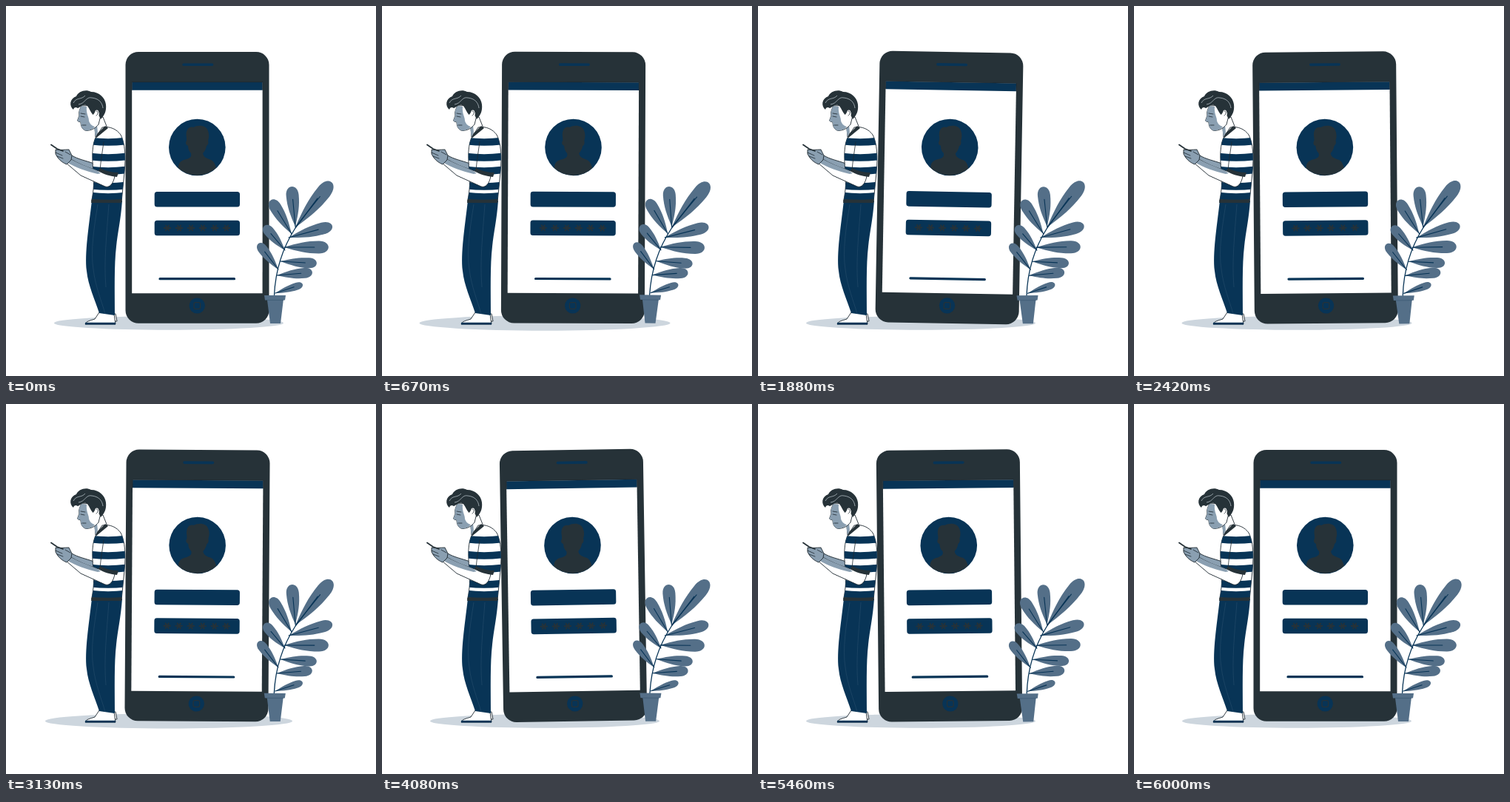
An HTML page for the animation above (6.04 s loop, 500x500 px).

```html
<!DOCTYPE html>
<html lang="en">
<head>
<meta charset="utf-8">
<title>Sign in</title>
<style>
html, body { margin: 0; width: 100%; height: 100%; overflow: hidden; background: #fff; }
svg { display: block; width: 100vw; height: 100vh; }
.navy { fill: #083456; }
.dark { fill: #263238; }
.slate { fill: #546f88; }
.skin { fill: #8a9fb1; }
.white { fill: #fff; }
.ink { stroke: #1d2930; stroke-width: .9; stroke-linejoin: round; }
.line { fill: none; stroke: #083456; stroke-linecap: round; }
.fine { fill: none; stroke: #1d2930; stroke-width: .8; stroke-linecap: round; }
</style>
</head>
<body>
<svg viewBox="0 0 500 500">
  <defs>
    <clipPath id="disc"><circle cx="258.3" cy="191" r="38"/></clipPath>
    <clipPath id="shirt"><path id="torso" d="M130 164C141 162 150 167 155 174C161 185 162 205 160 225L156 265L115.500 264C119 248 119 236 118 222C116 205 116 186 122 176Z"/></clipPath>
  </defs>

  <ellipse id="shadow" cx="220" cy="428.4" rx="155" ry="9.4" fill="#cdd6de"/>

  <g id="phone">
    <rect class="dark" x="161.5" y="62" width="194" height="366.8" rx="17.500"/>
    <path class="white" d="M170.200 103H346.600V388.200H170.200Z"/>
    <path class="navy" d="M170.200 103H346.600V113.800H170.200Z"/>
    <path class="fine" d="M170.200 113V102.700H346.800V113"/>
    <path class="line" d="M240 79.2h38.500" stroke-width="3.600"/>
    <circle class="navy" cx="258.3" cy="405" r="10.600"/>
    <rect x="254" y="400.7" width="8.600" height="8.600" rx="2" fill="none" stroke="#263238" stroke-width="1.300"/>
    <circle class="navy" cx="258.3" cy="191" r="38.300"/>
    <path class="dark" clip-path="url(#disc)" d="M244 178C242 168 247 162 253 164C260 160 271 161 273 169C275 174 274 179 273 182C274 185 273 188 271 189C270 194 268 197 266 199C267 205 272 206 277 208C282 210 283 216 285 222L285 232H231L233 216C234 210 239 208 244 207C249 205 251 204 250 199C247 196 246 193 246 189C243 188 242 185 244 182Z"/>
    <rect class="navy" x="200.7" y="251" width="115.300" height="20.600" rx="3.500"/>
    <rect class="navy" x="200.7" y="289.7" width="115.300" height="20.600" rx="3.500"/>
    <g id="stars" fill="none" stroke="#263238" stroke-width="1.900"/>
    <path class="line" d="M208 368.7h100.500" stroke-width="3.200"/>
  </g>

  <g id="man">
    <!-- legs and shoes -->
    <path class="white ink" d="M136 415L148 416L150 426H136Z"/>
    <path class="white ink" d="M126 414L146 416L148 430H107C108 426 114 425 120 423Z"/>
    <path class="navy" d="M107 427.800H148V430.600H107Z"/>
    <path class="navy" d="M116 263H157C155 290 151 305 149 325C146 350 147 385 147 418L126 415C120 396 111 378 109 358C106 335 112 298 116 263Z"/>
    <path d="M124 268C119 300 114 330 118 356C121 380 129 398 134 416M139 268C136 310 132 345 135 380" fill="none" stroke="#2c5370" stroke-width=".5"/>

    <!-- far arm -->
    <path class="skin ink" d="M81 204L89 202C97 207 108 209 119 213L118 223L92 213Z"/>

    <!-- shirt -->
    <path class="white ink" d="M120 162L121 177L128 177L137 165L131 150H124Z"/>
    <path class="skin" d="M119 165L121 177L124 171L123 161Z"/>
    <use href="#torso" class="white ink"/>
    <g id="stripes" clip-path="url(#shirt)" fill="none" stroke="#083456" stroke-width="9.600"/>
    <path class="dark" d="M121 179L123 173L134 162L138 165Z"/>
    <path class="dark" d="M116 261C130 262 145 262 156.500 261L156 266H115Z"/>
    <path class="fine" d="M132 184C130 198 128 210 127 222"/>

    <!-- near arm -->
    <path class="white ink" d="M86 206C97 213 110 218 122 222L132 225L147 230C145 240 140 246 134 244L101 229L81 212Z"/>
    <path class="skin" d="M86 206C97 213 110 217 122 222L128 226L124 227C108 223 95 219 82 211Z"/>
    <path class="dark" d="M125 223L127 219C135 223 143 225 152 225L150 231C141 230 133 228 125 223Z"/>

    <!-- hand and handset -->
    <path class="skin ink" d="M67 194C73 195 79 194 85 194L89 202L88 208L82 214C77 212 73 209 70 205L67 200Z"/>
    <path class="fine" d="M67 198L76 202M69 203L77 206M80 197L87 201"/>
    <path d="M61 187.500L69 193L77 196" fill="none" stroke="#263238" stroke-width="1.800" stroke-linecap="round"/>

    <!-- head -->
    <path class="white ink" d="M102 135C99 140 98 145 99 148L96.500 155C98 157 100 156 101 157C101 162 103 168 109 168.500C116 168 121 165 125 160L128 148L122 134Z"/>
    <path class="skin" d="M102 135C99 140 98 145 99 148L96.500 155C98 157 100 156 101 157C101 162 103 168 109 168.500C114 168 118 166 120 163C116 162 113 159 112 155C112 149 108 146 109 136Z"/>
    <path class="fine" d="M101 149L106 150M101 145L107 146M103 161L108 161M122 142C125 141 125 147 122 148"/>
    <path class="dark" d="M91 140C85 135 86 125 95 122C98 115 108 112 115 116C126 116 134 124 135 133C136 142 133 148 128 153L125.500 148C127 142 124 139 121 141C120 144 119 146 117.500 147C114 143 113 139 110 135C105 131 100 137 97 138C94 136 92 137 91 140Z"/>
    <path d="M91 131C95 123 102 127 107 121M98 133C107 132 108 122 116 124C125 125 130 130 131 138" fill="none" stroke="#c3cdd5" stroke-width=".7"/>
  </g>

  <g id="plant">
    <g id="leaves"/>
    <path class="line" d="M362.500 391C364 358 373 328 391 300L421 260" stroke-width="1.300"/>
    <path class="slate" d="M349 391H378L377 397.500H374.800L371 429H357L353 397.500H350Z"/>
    <path d="M353 397.500H375" fill="none" stroke="#3e5b75" stroke-width=".8"/>
  </g>
</svg>
<script>
const LOOP = 6040;
const el = id => document.getElementById(id);

el('stars').innerHTML = Array.from({ length: 6 }, (_, i) =>
  `<path transform="translate(${218 + i * 16} 300)" d="M-5 0H5M-2.500 -4L2.500 4M2.500 -4L-2.500 4"/>`).join('');

el('stripes').innerHTML = [182, 203, 221, 242, 256].map(y =>
  `<path d="M110 ${y}Q138 ${y + 4} 166 ${y}"/>`).join('');

// base x, base y, tip x, tip y, half width
const leaves = [
  [391, 299, 440, 238, 10], [391, 298, 386, 244, 8.500], [386, 308, 358, 262, 8],
  [377, 330, 349, 297, 7], [368, 356, 341, 321, 6.500], [382, 313, 441, 297, 8],
  [376, 326, 436, 326, 8.500], [371, 345, 420, 348, 7], [366, 364, 414, 360, 7],
  [364, 388, 401, 376, 5]
];

function leaf([x, y, tx, ty, w]) {
  const len = Math.hypot(tx - x, ty - y);
  const turn = Math.atan2(ty - y, tx - x) * 180 / Math.PI;
  const out = `${len * .3} ${-w * .65} ${len * .5} ${-w} ${len * .78} ${-w}`;
  const tip = `${len * 1.07} ${-w} ${len * 1.07} ${w} ${len * .78} ${w}`;
  const back = `${len * .5} ${w} ${len * .3} ${w * .65} 0 0`;
  return `<g transform="translate(${x} ${y}) rotate(${turn})">
    <path class="slate" d="M0 0C${out}C${tip}C${back}Z"/>
    <path class="line" d="M0 0H${len * .68}" stroke-width="1.100"/></g>`;
}
el('leaves').innerHTML = leaves.map(leaf).join('');

// Triangle wave between -1 and 1 degree
function sway(t, period) {
  const p = t / period % 1;
  return p < .25 ? 4 * p : p < .75 ? 2 - 4 * p : 4 * p - 4;
}

// Two linear pulses, peaking at 600 and 3000 ms
function pulse(t) {
  const bump = (start, peak, end) =>
    Math.max(0, Math.min((t - start) / (peak - start), (end - t) / (end - peak)));
  return 1 + .1 * (bump(0, 600, 1800) + bump(2400, 3000, 3600));
}

function draw(now) {
  const t = now % LOOP;
  el('phone').setAttribute('transform', `rotate(${sway(t, 1500)} 258.500 245.500)`);
  el('plant').setAttribute('transform', `rotate(${sway(t, 3000)} 391 333)`);
  el('shadow').setAttribute('transform',
    `translate(220 428.4) scale(${pulse(t)}) translate(-220 -428.4)`);
  requestAnimationFrame(draw);
}
draw(performance.now());
</script>
</body>
</html>
```
